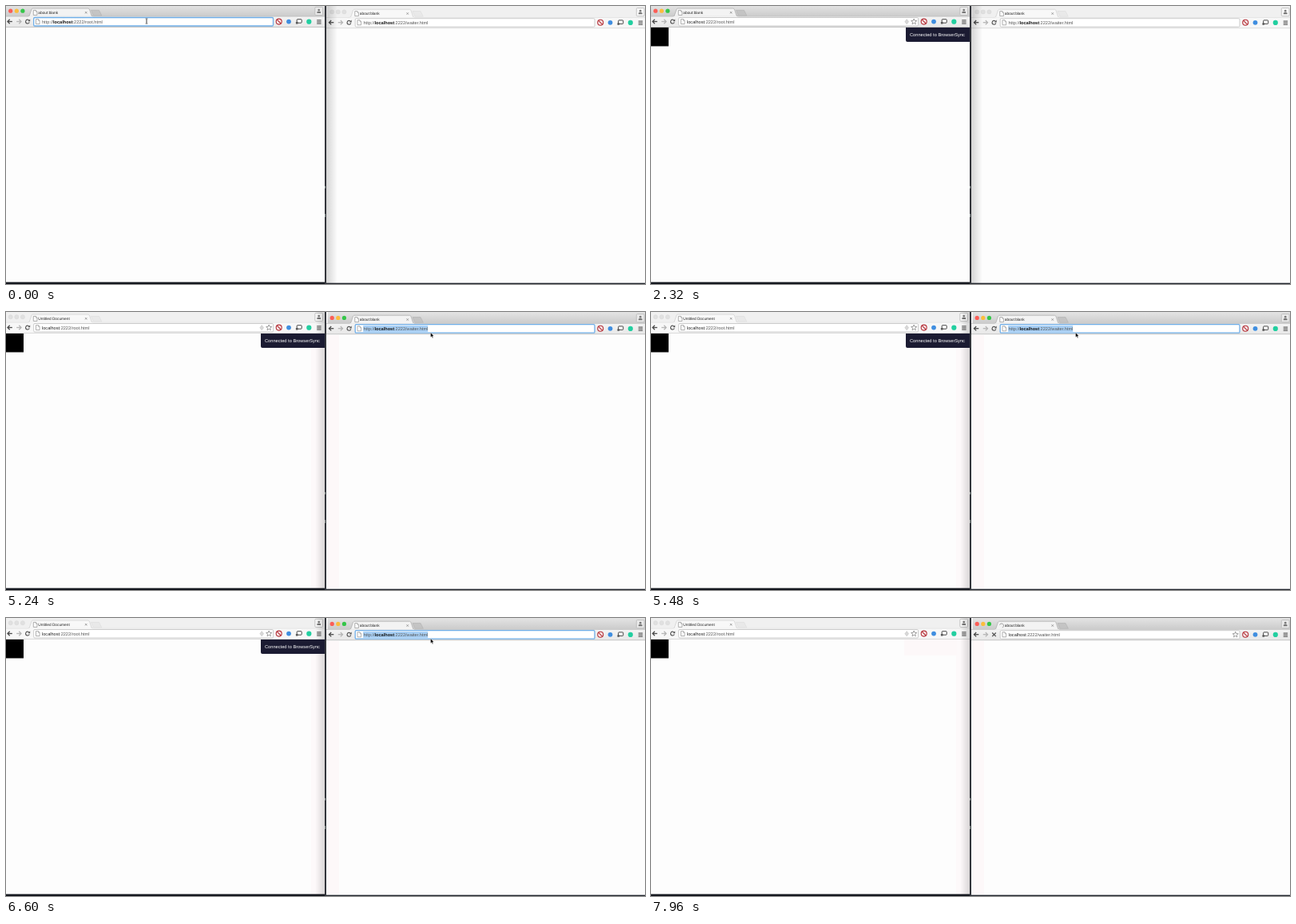
These frames come from a looping animation (800 px wide and 349 px high, 8000 ms). An HTML page with a canvas:

```html
<!DOCTYPE html>
<html lang="en">
<head>
<meta charset="utf-8">
<title>Two browser windows</title>
<style>
html, body { margin: 0; width: 100%; height: 100%; overflow: hidden; background: #fdfdfd; }
canvas { display: block; width: 800px; height: 349px; }
</style>
</head>
<body>
<canvas id="stage" width="800" height="349"></canvas>
<script>
const ctx = document.getElementById('stage').getContext('2d');
const LOOP = 8000;
const FONT = '"Liberation Sans", Arial, sans-serif';
const T = {
  leftLoad: 2080, notice: 2160, leftTitle: 2440,
  cursorBack: 3800, switchFocus: 4800,
  noticeGone: 6960, rightLoad: 7520
};
// Pointer keyframes: time, x, y
const POINTER = [[3800, 176, 19], [4240, 443.5, 25.5], [4600, 508, 23], [4840, 526, 21.5], [5040, 531.5, 25.8]];

const clamp01 = v => Math.max(0, Math.min(1, v));

function rect(x, y, w, h, fill) {
  ctx.fillStyle = fill;
  ctx.fillRect(x, y, w, h);
}

function rounded(x, y, w, h, radius, fill, stroke, width = 0.8) {
  ctx.beginPath();
  ctx.roundRect(x, y, w, h, radius);
  paint(fill, stroke, width);
}

function shape(points, fill, stroke, width = 0.8, close = true) {
  ctx.beginPath();
  points.forEach(([x, y]) => ctx.lineTo(x, y));
  if (close) ctx.closePath();
  paint(fill, stroke, width);
}

function circle(x, y, r, fill, stroke, width = 0.8) {
  ctx.beginPath();
  ctx.arc(x, y, r, 0, Math.PI * 2);
  paint(fill, stroke, width);
}

function paint(fill, stroke, width) {
  if (fill) { ctx.fillStyle = fill; ctx.fill(); }
  if (stroke) { ctx.strokeStyle = stroke; ctx.lineWidth = width; ctx.stroke(); }
}

function line(x1, y1, x2, y2, color, width) {
  shape([[x1, y1], [x2, y2]], null, color, width, false);
}

function gradient(x1, y1, x2, y2, from, to) {
  const g = ctx.createLinearGradient(x1, y1, x2, y2);
  g.addColorStop(0, from);
  g.addColorStop(1, to);
  return g;
}

// Draws text and returns the x where it ends
function text(str, x, y, size, color, weight = '') {
  ctx.font = `${weight} ${size}px ${FONT}`;
  ctx.fillStyle = color;
  ctx.fillText(str, x, y);
  return x + ctx.measureText(str).width;
}

function pageIcon(x, y) {
  shape([[x, y], [x + 3, y], [x + 4.6, y + 1.7], [x + 4.6, y + 6], [x, y + 6]], '#fff', '#8f8f8f', 0.7);
  shape([[x + 3, y], [x + 3, y + 1.8], [x + 4.6, y + 1.8]], null, '#8f8f8f', 0.5, false);
}

function star(x, y, r) {
  const points = Array.from({ length: 10 }, (_, i) => {
    const a = -Math.PI / 2 + i * Math.PI / 5, d = i % 2 ? r * 0.45 : r;
    return [x + d * Math.cos(a), y + d * Math.sin(a)];
  });
  shape(points, '#fff', '#777', 0.7);
}

function arrow(x, dir, color) {
  line(x - 2.8, 19.5, x + 2.8, 19.5, color, 1.3);
  const tip = x + dir * 3;
  shape([[tip - dir * 2.7, 16.8], [tip, 19.5], [tip - dir * 2.7, 22.2]], null, color, 1.3, false);
}

function reloadIcon(x, y) {
  ctx.beginPath();
  ctx.arc(x, y, 2.4, 0.3, Math.PI * 1.75);
  paint(null, '#555', 1.1);
  shape([[x + 3.2, y - 3.2], [x + 3.2, y - 0.3], [x + 0.3, y - 0.3]], '#555');
}

function cross(x, y, r, color, width) {
  line(x - r, y - r, x + r, y + r, color, width);
  line(x - r, y + r, x + r, y - r, color, width);
}

function extensions() {
  circle(341.7, 19.6, 3.5, '#f6e9e9', '#b5323a', 1.1);
  line(339.3, 17.2, 344.1, 22, '#b5323a', 1.1);
  circle(354, 19.6, 2.9, '#3f8ee0');
  rounded(364.2, 16.7, 6, 4.5, 0.8, '#fff', '#333', 0.9);
  rounded(362.9, 20, 2.6, 2.5, 0.5, '#555');
  circle(379.3, 19.7, 3.1, '#22cfa0');
  for (const y of [17.3, 19.4, 21.5]) rect(389.2, y, 5.4, 1.1, '#555');
}

function tabStrip(win) {
  const { focused } = win;
  rect(0, -2, 400, 15, focused ? gradient(0, 0, 0, 13, '#e2e2e2', '#cbcbcb') : '#f0f0f0');
  const lights = focused ? ['#fb5e57', '#fbbd3d', '#35c64a'] : Array(3).fill('#e0e0e0');
  lights.forEach((c, i) => circle(5.7 + i * 7.6, 6.2, 2.6, c, focused ? null : '#d4d4d4', 0.4));

  const edge = focused ? '#aaa' : '#cecece';
  shape([[106.5, 5.3], [116.5, 5.3], [119.8, 12], [109.5, 12]],
    focused ? '#c4c4c4' : '#e9e9e9', focused ? '#b0b0b0' : '#dcdcdc', 0.6);
  shape([[27.5, 13.4], [29.2, 12.4], [32, 4], [33.2, 3], [103, 3], [104.4, 4], [107.2, 12.4], [109, 13.4]],
    focused ? '#f3f3f3' : '#f8f8f8', edge, 0.7);

  if (win.spin === null) pageIcon(34.3, 5.4);
  else {
    ctx.beginPath();
    ctx.arc(36.4, 8.4, 2.6, win.spin, win.spin + 4);
    paint(null, '#8c8c8c', 0.8);
  }
  text(win.title, 40.3, 10.1, 4.8, '#222');
  cross(100.2, 8.3, 1.2, '#777', 0.7);

  rounded(386.8, 1.3, 9.8, 10.2, 1.2, focused ? '#e9e9e9' : '#f8f8f8', '#b2b2b2', 0.7);
  circle(391.7, 5, 1.35, '#777');
  rounded(389.4, 6.7, 4.6, 2.3, [1.3, 1.3, 0, 0], '#777');
}

function addressBar(win) {
  rounded(34.7, 14.5, 299.8, 10.5, 1.3, '#fff', win.editing ? '#6faee8' : '#c1c1c1', win.editing ? 1.3 : 0.8);
  pageIcon(37.5, 16.6);
  if (win.selected) rect(44.7, 15.8, 81, 8, '#a9d0f5');
  let x = 45;
  if (win.loaded) {
    x = text('localhost', x, 21.8, 5.6, '#222');
  } else {
    x = text('http://', x, 21.8, 5.6, '#555');
    x = text('localhost', x, 21.8, 5.6, '#111', 'bold');
  }
  text(':2222/' + win.file, x, 21.8, 5.6, '#555');
  if (win.loaded) {
    star(329.2, 19.7, 3.7);
    if (win.badge) shape([[320.2, 16.6], [322.6, 19.7], [320.2, 22.8], [317.8, 19.7]], '#d8d8d8', '#bdbdbd', 0.5);
  }
}

function browser(win) {
  ctx.save();
  ctx.beginPath();
  ctx.rect(win.clipX, 0, win.clipW, 349);
  ctx.clip();
  ctx.translate(win.x, win.y);
  rect(-2, 0, 404, win.height, '#fdfdfd');
  tabStrip(win);
  rect(-2, 13, 404, 13.5, win.focused ? gradient(0, 13, 0, 26, '#f4f4f4', '#e8e8e8') : '#f7f7f7');
  rect(-2, 12.8, 30, 0.6, win.focused ? '#b4b4b4' : '#dadada');
  rect(108.5, 12.8, 292, 0.6, win.focused ? '#b4b4b4' : '#dadada');
  rect(-2, 26.2, 404, 0.8, win.focused ? '#b9b9b9' : '#d4d4d4');
  arrow(5, -1, '#4a4a4a');
  arrow(16, 1, '#b5b5b5');
  if (win.spin === null) reloadIcon(27, 19.6);
  else cross(27, 19.6, 2.3, '#555', 1.3);
  addressBar(win);
  extensions();
  ctx.restore();
}

function notice() {
  rounded(319, 27, 80, 18, [0, 0, 0, 2], '#1b1b32');
  text('Connected to BrowserSync', 324, 38, 5.7, '#fff');
}

function desktop() {
  rect(0, 346.6, 401, 2.4, '#15181f');
  rect(399, 0, 2, 349, '#33353b');
  rect(401, 347.7, 399, 1.3, '#20242c');
  rect(399, 226, 1.2, 3, '#8a9290');
  rect(399, 261, 1.2, 4, '#8a9290');
}

function pointer(t) {
  if (t < T.leftLoad) return ibeam(176, 19);
  if (t < T.cursorBack || t >= T.rightLoad) return;
  let [, x, y] = POINTER[POINTER.length - 1];
  for (let i = 1; i < POINTER.length; i++) {
    const [t0, x0, y0] = POINTER[i - 1], [t1, x1, y1] = POINTER[i];
    if (t < t1) {
      const k = clamp01((t - t0) / (t1 - t0)), e = k * k * (3 - 2 * k);
      x = x0 + (x1 - x0) * e;
      y = y0 + (y1 - y0) * e;
      break;
    }
  }
  const overField = (x < 335 || x > 438) && y < 25;
  if (overField) ibeam(x, y);
  else shape([[0, 0], [0, 6], [1.4, 4.8], [2.4, 7], [3.3, 6.5], [2.4, 4.5], [4.2, 4.4]]
    .map(([dx, dy]) => [x + dx, y + dy]), '#000', '#fff', 0.4);
}

function ibeam(x, y) {
  line(x, y - 2.8, x, y + 2.8, '#222', 0.9);
  line(x - 1.4, y - 3.1, x + 1.4, y - 3.1, '#444', 0.7);
  line(x - 1.4, y + 3.1, x + 1.4, y + 3.1, '#444', 0.7);
}

function draw(t) {
  const rightFocus = t >= T.switchFocus;
  const leftLoaded = t >= T.leftLoad;
  const rightLoaded = t >= T.rightLoad;
  rect(0, 0, 800, 349, '#fdfdfd');
  browser({
    x: 0, y: 0, clipX: 0, clipW: 399, height: 347, file: 'root.html',
    title: t >= T.leftTitle ? 'Untitled Document' : 'about:blank',
    focused: !rightFocus, editing: !leftLoaded, loaded: leftLoaded, badge: true, spin: null
  });
  browser({
    x: 402.5, y: 1.2, clipX: 401, clipW: 399, height: 348, file: 'waiter.html', title: 'about:blank',
    focused: rightFocus, editing: rightFocus && !rightLoaded, selected: rightFocus && !rightLoaded,
    loaded: rightLoaded, spin: rightLoaded ? -(t - T.rightLoad) / 1000 * Math.PI * 2 : null
  });

  if (rightFocus) {
    rect(382, 27, 17, 320, '#fdf9fa');
    rect(402, 29, 15, 318, '#fdf8f9');
    rect(387, 0, 12, 347, gradient(387, 0, 399, 0, 'rgba(0,0,0,0)', 'rgba(0,0,0,0.14)'));
  } else {
    rect(401, 0, 14, 348, gradient(401, 0, 415, 0, 'rgba(0,0,0,0.16)', 'rgba(0,0,0,0)'));
  }
  if (leftLoaded) rect(0, 27, 22, 23.5, '#000');
  if (t >= T.noticeGone) rect(317, 27, 66, 20, '#fdf8f9');
  else if (t >= T.notice) notice();
  desktop();
  pointer(t);
}

ctx.textRendering = 'geometricPrecision';
const start = performance.now();
function tick() {
  draw((performance.now() - start) % LOOP);
  requestAnimationFrame(tick);
}
tick();
</script>
</body>
</html>
```
